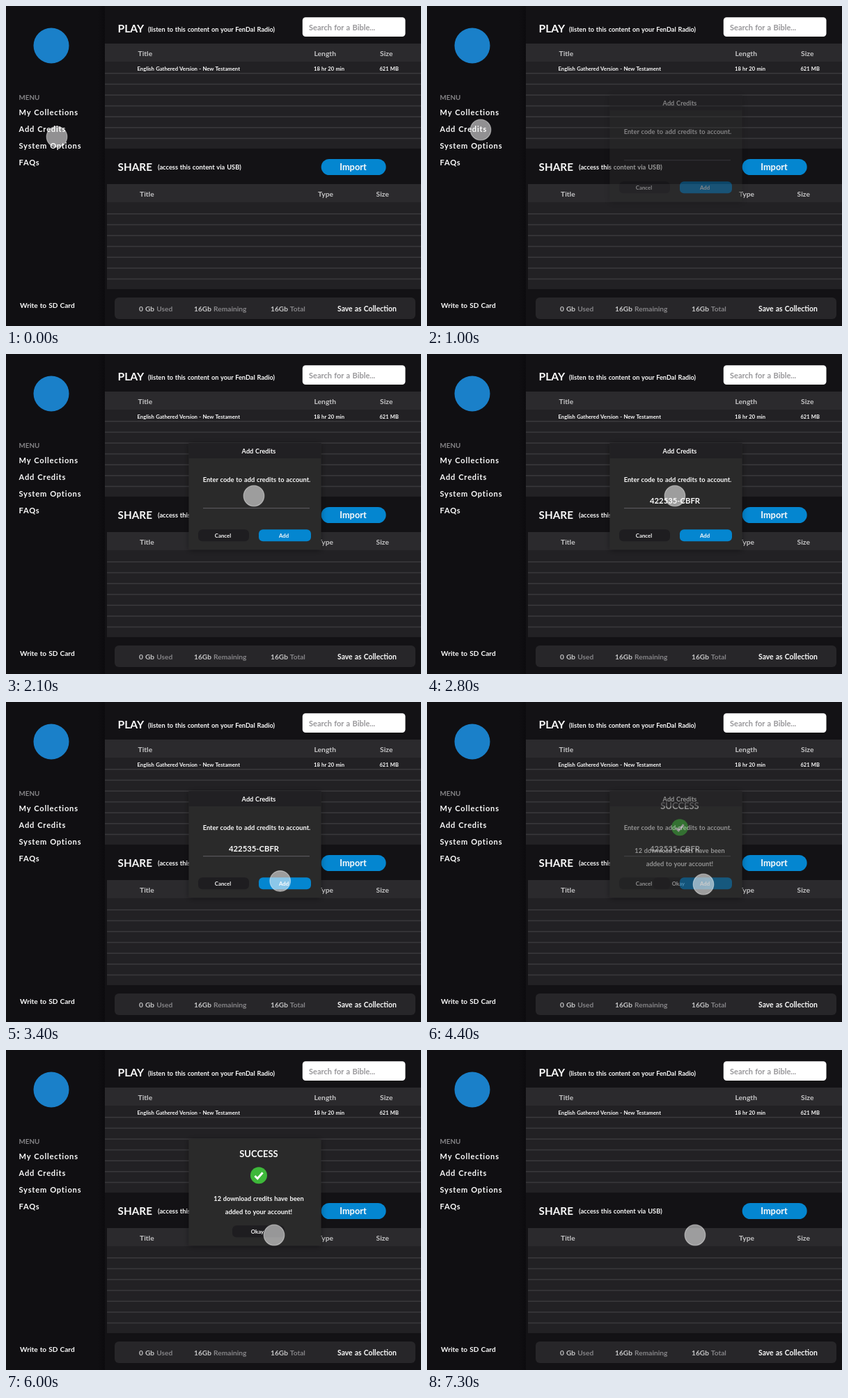
Write an HTML page that moves like this. It is 596 px wide and 460 px high and loops after 7.4 s.

```html
<!DOCTYPE html>
<html lang="en">
<head>
<meta charset="utf-8">
<title>Add credits</title>
<style>
  html, body { margin: 0; width: 100%; height: 100%; overflow: hidden; background: #121114; }
  svg { display: block; width: 596px; height: 460px; }
  text { font-family: Lato, "Open Sans", sans-serif; font-weight: 700; word-spacing: .06em; white-space: pre; }
</style>
</head>
<body>
<svg id="stage" viewBox="0 0 596 460" xmlns="http://www.w3.org/2000/svg">
  <defs>
    <linearGradient id="side">
      <stop offset="0" stop-color="#100f12"/>
      <stop offset=".93" stop-color="#100f12"/>
      <stop offset="1" stop-color="#0c0b0e"/>
    </linearGradient>
    <filter id="shadow" x="-10%" y="-10%" width="120%" height="120%">
      <feDropShadow dx="0" dy="1" stdDeviation="4" flood-color="#000" flood-opacity=".4"/>
    </filter>
  </defs>
  <g id="page"></g>
  <g id="dialog">
    <g id="panel" filter="url(#shadow)"></g>
    <g id="success"></g>
    <g id="form"></g>
  </g>
  <circle id="pointer" r="14.8" fill="#fff" fill-opacity=".54" stroke="#fff" stroke-opacity=".45" stroke-width="1.2"/>
</svg>
<script>
const LOOP = 7400, FRAME = 100;
const CODE = '422535-CBFR';
const WHITE = '#fafafa', GREY = '#c4c4c5', DIM = '#858487', BLUE = '#0486d0';
const $ = id => document.getElementById(id);

function add(parent, tag, attrs, content = '') {
  const node = document.createElementNS('http://www.w3.org/2000/svg', tag);
  for (const key in attrs) node.setAttribute(key, attrs[key]);
  node.innerHTML = content;
  return parent.appendChild(node);
}
const box = (parent, x, y, width, height, fill, rx = 0) =>
  add(parent, 'rect', { x, y, width, height, fill, rx });

// y is the middle of the capital letters
const label = (parent, x, y, size, content, fill = WHITE, more = {}) =>
  add(parent, 'text', { x, y: y + size * .36, 'font-size': size, fill, ...more }, content);
const centred = (parent, x, y, size, content, fill = WHITE) =>
  label(parent, x, y, size, content, fill, { 'text-anchor': 'middle' });

function button(parent, x, width, textX, content, fill = '#1e1d20') {
  box(parent, x, 252.3, width, 17, fill, 6);
  centred(parent, textX, 261.2, 7.8, content);
}

function table(x, top, columns) {
  box(page, x, top, 596 - x, 26, '#2b2a2d');
  box(page, x, top + 26, 596 - x, 125, '#222124');
  for (let i = 0; i < 7; i++) box(page, x, top + 42 + i * 15.6, 596 - x, 1.6, '#39383b');
  for (const [name, left] of columns) label(page, left, top + 14, 10.3, name, GREY);
}

function buildPage() {
  box(page, 0, 0, 596, 460, '#131215');
  box(page, 0, 0, 142, 460, 'url(#side)');
  add(page, 'circle', { cx: 65, cy: 57, r: 25.5, fill: '#1a80c9' });

  label(page, 18.5, 131.5, 9.8, 'MENU', DIM);
  ['My Collections', 'Add Credits', 'System Options', 'FAQs'].forEach((item, i) =>
    label(page, 18.5, 153 + i * 24.1, 11.1, item, WHITE, { 'letter-spacing': .8 }));
  label(page, 20, 430, 10.1, 'Write to SD Card');

  label(page, 160.5, 32.5, 15.7, 'PLAY');
  label(page, 204, 33.5, 9.2, '(listen to this content on your FenDal Radio)');
  box(page, 425.8, 16.3, 147.7, 27.7, '#fff', 4.5);
  label(page, 435, 30.7, 11, 'Search for a Bible...', '#98979a');
  table(142, 54, [['Title', 189.5], ['Length', 442.5], ['Size', 537]]);
  label(page, 188.5, 90, 7.7, 'English Gathered Version - New Testament');
  label(page, 442, 90, 7.6, '18 hr 20 min');
  label(page, 536.5, 90, 7.5, '621 MB');

  label(page, 160.5, 231.5, 15.3, 'SHARE');
  label(page, 218, 231.5, 9.3, '(access this content via USB)');
  box(page, 452.7, 220, 93, 23, BLUE, 11.5);
  centred(page, 498.5, 231.5, 12.8, 'Import');
  table(145, 256, [['Title', 192], ['Type', 448], ['Size', 531.5]]);

  box(page, 156, 419, 432, 31, '#272629', 6);
  for (const [x, amount, kind] of [[191, '0 Gb', 'Used'], [270, '16Gb', 'Remaining'], [380, '16Gb', 'Total']])
    label(page, x, 435, 10.2, `<tspan fill="${GREY}">${amount}</tspan> ${kind}`, DIM);
  label(page, 476, 435, 10.4, 'Save as Collection');
}

function buildDialog() {
  box($('panel'), 262.5, 128, 190, 153, '#2a292c', 1);

  const success = $('success');
  centred(success, 363, 149, 13, 'SUCCESS');
  add(success, 'circle', { cx: 363, cy: 180.3, r: 12, fill: '#3eb83a' });
  add(success, 'path', { d: 'M357.4 181 l3.8 3.8 l7.4 -8.6', fill: 'none', stroke: '#fff', 'stroke-width': 2.9 });
  centred(success, 363, 213.5, 9.2, '12 download credits have been');
  centred(success, 363, 232.5, 9.3, 'added to your account!');
  button(success, 325, 75, 361, 'Okay');

  const form = $('form');
  box(form, 262.5, 128, 190, 22, '#212023');
  centred(form, 363, 139.3, 9.2, 'Add Credits');
  centred(form, 360, 180.3, 9.3, 'Enter code to add credits to account.');
  box(form, 283, 221, 153, 1.2, '#57565a');
  button(form, 276, 73, 311.5, 'Cancel');
  button(form, 363, 75, 399, 'Add', BLUE);
  return label(form, 320, 210.5, 11.3, '');
}

const page = $('page');
buildPage();
const codeText = buildDialog();

const ramp = (t, from, to) => Math.min(1, Math.max(0, (t - from) / (to - from)));
const ease = u => u < .5 ? 2 * u * u : 1 - 2 * (1 - u) ** 2;

// each move: start, end, target x, target y
const START = [73, 188];
const MOVES = [
  [0, 800, 77, 178],
  [1150, 2000, 356, 204],
  [2800, 3550, 397, 262],
  [5600, 6000, 385, 266],
];

function pointerAt(t) {
  let [x, y] = START;
  for (const [from, to, tx, ty] of MOVES) {
    const u = ease(ramp(t, from, to));
    x += (tx - x) * u;
    y += (ty - y) * u;
  }
  return [x, y];
}

function draw(now) {
  const t = Math.floor(now % LOOP / FRAME) * FRAME;
  const swap = ramp(t, 4200, 4600);
  $('dialog').setAttribute('opacity', ramp(t, 820, 1220) * (1 - ramp(t, 6300, 6700)));
  $('form').setAttribute('opacity', 1 - swap);
  $('success').setAttribute('opacity', swap);
  codeText.textContent = CODE.slice(0, Math.round(CODE.length * ramp(t, 2200, 2800)));
  $('pointer').setAttribute('transform', `translate(${pointerAt(t)})`);
  requestAnimationFrame(draw);
}
draw(0);
</script>
</body>
</html>
```
